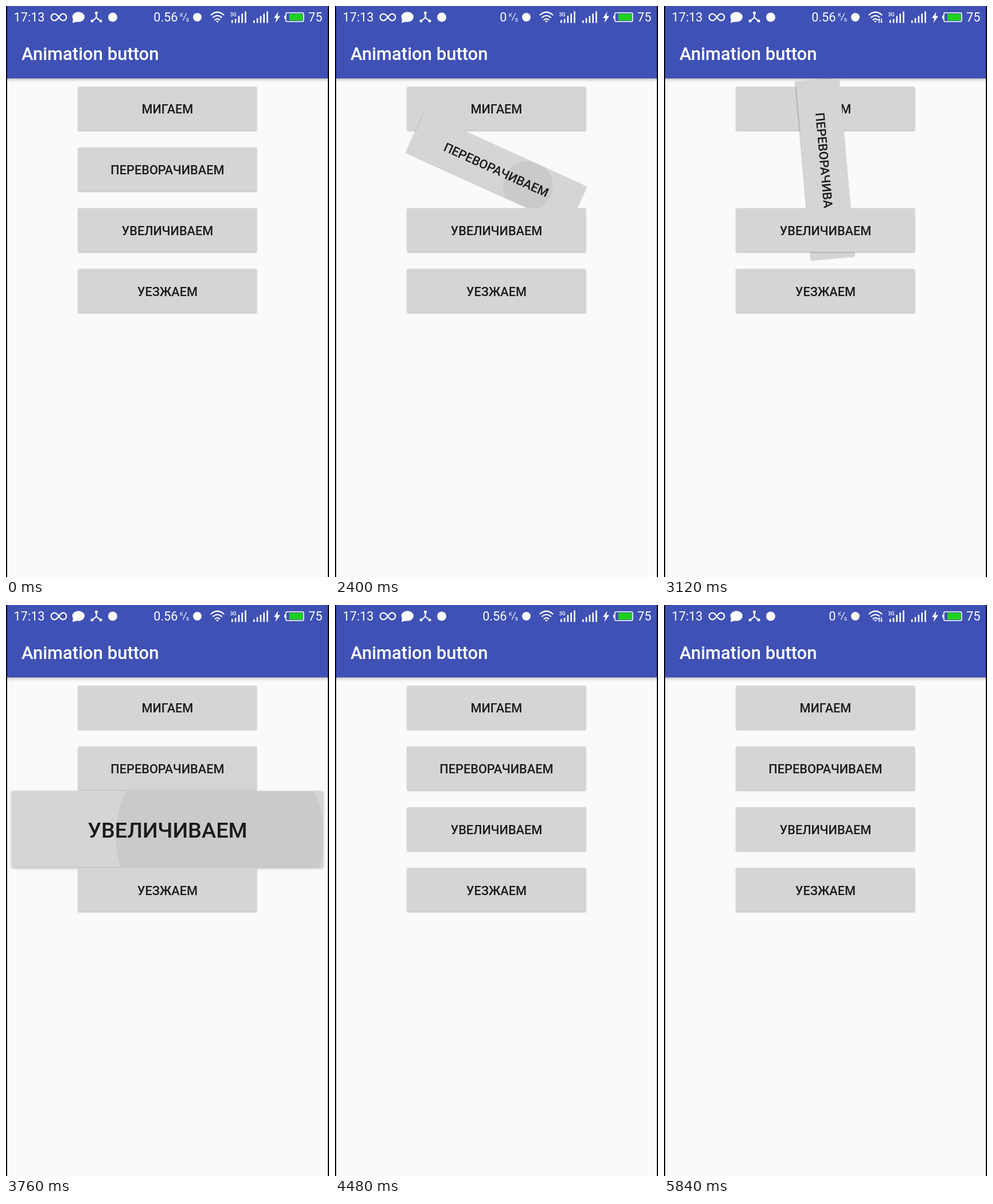
An HTML page that plays this animation: 563 px wide and 994 px high, repeating every 5.92 s.

```html
<!DOCTYPE html>
<html lang="ru">
<head>
<meta charset="utf-8">
<title>Animation button</title>
<style>
  html, body { margin: 0; width: 100%; height: 100%; overflow: hidden; background: #fafafa; }
  svg { display: block; width: 563px; height: 994px; font-family: Roboto, "Noto Sans", sans-serif; }
  .label { font-size: 21.7px; font-weight: 500; fill: #1b1b1b; text-anchor: middle; }
  .face { fill: #d5d5d5; filter: drop-shadow(0 1.5px 1.2px rgba(0, 0, 0, .3)); }
  .status { font-size: 21.7px; }
  .line { fill: none; stroke: #fff; stroke-width: 2.2; stroke-linecap: round; }
</style>
</head>
<body>
<svg viewBox="0 0 563 994">
  <defs>
    <clipPath id="content"><rect x="2" y="126" width="559" height="868"/></clipPath>
    <clipPath id="bounds"><rect x="-155.7" y="-38" width="311.4" height="76" rx="1.5"/></clipPath>
    <linearGradient id="shade" x2="0" y2="1">
      <stop offset="0" stop-opacity=".25"/>
      <stop offset=".4" stop-opacity=".09"/>
      <stop offset="1" stop-opacity="0"/>
    </linearGradient>
  </defs>
  <rect width="563" height="994" fill="#fafafa"/>
  <rect y="126" width="563" height="7" fill="url(#shade)"/>
  <g id="buttons" clip-path="url(#content)"></g>

  <rect width="563" height="126" fill="#3f51b5"/>
  <text x="27" y="94" font-size="31" font-weight="500" fill="#fff">Animation button</text>

  <g fill="#fff">
    <g class="status">
      <text x="13.5" y="27">17:13</text>
      <text id="speed" x="299.5" y="27" text-anchor="end"></text>
      <text x="527" y="27">75</text>
    </g>
    <path class="line" d="M92 19.5C88 14 86 13.7 84.500 13.700A5.800 5.800 0 0 0 84.500 25.300C88 25.300 90 22 92 19.500S96 13.700 99.500 13.700A5.800 5.800 0 0 1 99.500 25.300C96 25.300 94 22 92 19.500"/>
    <ellipse cx="126.300" cy="19" rx="10.700" ry="8.700"/>
    <path d="M117 22L116 29.500L125 27Z"/>
    <path class="line" d="M157.500 12V20L150.500 26M157.500 20L164.500 26"/>
    <circle cx="157.500" cy="12" r="2.500"/>
    <circle cx="150" cy="26" r="2.500"/>
    <circle cx="165" cy="26" r="2.500"/>
    <circle cx="186" cy="19.500" r="8"/>
    <text x="303" y="18.500" font-size="9.500">K</text>
    <text x="313.500" y="27" font-size="11">s</text>
    <path class="line" style="stroke-width:1.2" d="M308.500 25L314.500 13"/>
    <circle cx="333.500" cy="19.500" r="7.500"/>
    <path class="line" d="M357.500 15.500Q368.500 6 379.500 15.500M361 19.800Q368.500 13.400 376 19.800M364.500 24Q368.500 20.600 372.500 24"/>
    <path d="M365.800 25.800H371.200L368.500 29Z"/>
    <g id="traffic">
      <rect x="373" y="20" width="9" height="11" fill="#3f51b5"/>
      <path class="line" style="stroke-width:1.5" d="M375 29V23M379 22V28"/>
      <path d="M372.700 24.500L375 21.500L377.300 24.500ZM376.700 26.500L379 29.800L381.300 26.500Z"/>
    </g>
    <text x="390.500" y="17.500" font-size="9" font-weight="500">3G</text>
    <g id="bars"></g>
    <path d="M474.500 10L467 21H471.300L469.500 29.500L478 17.500H473.300Z"/>
    <rect x="485" y="16.500" width="2.500" height="6" rx="1"/>
    <rect x="487.800" y="11.800" width="31" height="15.400" rx="2.500" fill="none" stroke="#fff" stroke-width="1.600"/>
    <rect x="494" y="13.500" width="23.500" height="12" fill="#1fd11f"/>
  </g>
  <path d="M0 0H2V994H0ZM561 0H563V994H561Z"/>
</svg>
<script>
const NS = 'http://www.w3.org/2000/svg';
const LOOP = 5920, STEP = 80, CENTER_X = 281.4;
const byId = id => document.getElementById(id);

function add(parent, tag, attrs = {}) {
  const el = parent.appendChild(document.createElementNS(NS, tag));
  for (const key in attrs) el.setAttribute(key, attrs[key]);
  return el;
}

// Each animation runs forward for `half` ms and then back again.
const buttons = [
  { label: 'МИГАЕМ', start: 1270, half: 480, touch: [55, 4],
    pose: (el, p) => el.setAttribute('opacity', 1 - p) },
  { label: 'ПЕРЕВОРАЧИВАЕМ', start: 2320, half: 477, touch: [62, 4],
    move: p => `rotate(${360 * p})` },
  { label: 'УВЕЛИЧИВАЕМ', start: 3569, half: 458, touch: [52.5, 7],
    move: p => `scale(${1 + 2 * p})` },
  { label: 'УЕЗЖАЕМ', start: 4810, half: 430, touch: [55, 4],
    move: p => `translate(${559 * p} 0)` }
];

buttons.forEach((b, i) => {
  b.y = 178.4 + 105.8 * i;
  b.group = add(byId('buttons'), 'g');
  add(b.group, 'rect', { x: -155.7, y: -38, width: 311.4, height: 76, rx: 1.5, class: 'face' });
  const clip = add(b.group, 'g', { 'clip-path': 'url(#bounds)' });
  b.ripple = add(clip, 'circle', { cx: b.touch[0], cy: b.touch[1] });
  add(b.group, 'text', { y: 8.7, class: 'label' }).textContent = b.label;
});

for (const left of [393, 431]) {
  for (let i = 0; i < 5; i++) {
    const height = left === 393 && i < 2 ? 5 + 2 * i : 4.5 + 3.9 * i;
    add(byId('bars'), 'rect', { x: left + 5.8 * i, y: 29.5 - height, width: 2.6, height });
  }
}

const clamp = v => Math.max(0, Math.min(1, v));
const ease = v => (1 - Math.cos(Math.PI * clamp(v))) / 2;
const within = (t, from, to) => t >= from && t < to;

function drawButton(b, t) {
  const age = t - b.start;
  const phase = age / b.half;
  const p = ease(phase < 1 ? phase : 2 - phase);
  b.group.setAttribute('transform',
    `translate(${CENTER_X} ${b.y}) ${b.move ? b.move(p) : ''}`);
  if (b.pose) b.pose(b.group, p);
  b.ripple.setAttribute('r', Math.max(0, Math.min(240, age * 0.545)));
  b.ripple.setAttribute('opacity', 0.05 * clamp((600 - age) / 350));
}

function render(time) {
  const t = Math.floor((time % LOOP) / STEP) * STEP;
  for (const b of buttons) drawButton(b, t);
  const busy = t < 240 || within(t, 2640, 5120);
  byId('speed').textContent = busy ? '0.56' : '0';
  byId('traffic').style.display = within(t, 2640, 3280) || t >= 5840 ? '' : 'none';
}

const origin = performance.now();
function tick() {
  render(performance.now() - origin);
  requestAnimationFrame(tick);
}
tick();
</script>
</body>
</html>
```
